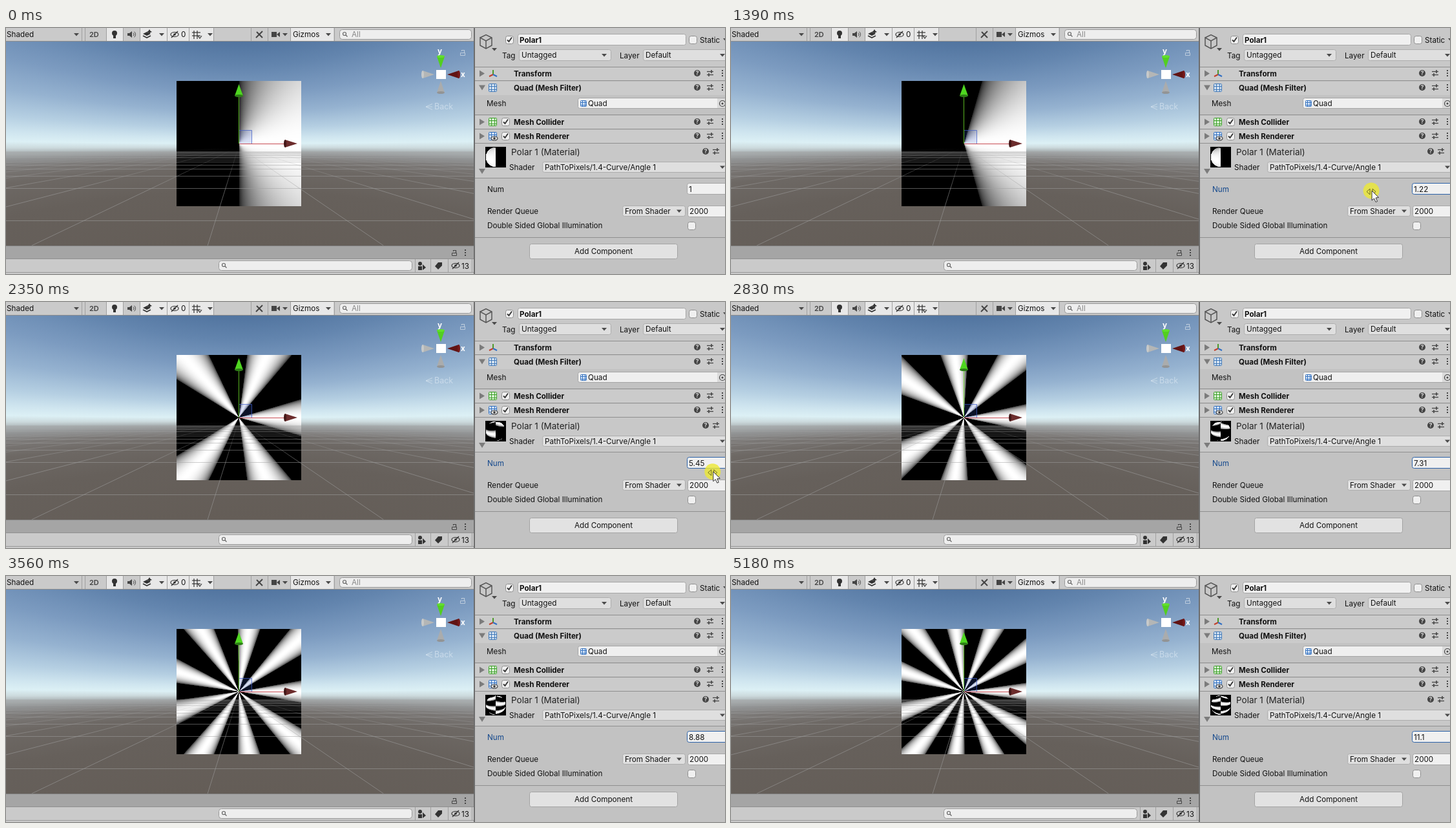
An HTML page with a canvas for the animation above (6.11 s loop, 1113 by 381 pixels).

```html
<!DOCTYPE html>
<html lang="en">
<head>
<meta charset="utf-8">
<style>
html, body { margin: 0; width: 100%; height: 100%; overflow: hidden; background: #c2c2c2; }
canvas { display: block; }
</style>
</head>
<body>
<canvas id="stage" width="1113" height="381"></canvas>
<script>
const LOOP = 6110, TAU = Math.PI * 2;
const view = document.getElementById('stage').getContext('2d');

function layer(w, h) {
  const c = document.createElement('canvas');
  c.width = w;
  c.height = h;
  return c.getContext('2d');
}
const back = layer(1113, 381), front = layer(1113, 381);
const quad = layer(193, 194), ball = layer(32, 32);
let g = back;

// Drawing helpers
function rect(x, y, w, h, fill) {
  g.fillStyle = fill;
  g.fillRect(x, y, w, h);
}
function box(x, y, w, h, fill, stroke = '#a6a6a6', r = 3) {
  g.beginPath();
  g.roundRect(x + .5, y + .5, w - 1, h - 1, r);
  if (fill) { g.fillStyle = fill; g.fill(); }
  g.strokeStyle = stroke;
  g.lineWidth = 1;
  g.stroke();
}
function text(s, x, y, { size = 11.7, weight = 400, color = '#111' } = {}) {
  g.font = `${weight} ${size}px Inter, sans-serif`;
  g.fillStyle = color;
  g.fillText(s, x, y);
}
const bold = (s, x, y) => text(s, x, y, { weight: 700, size: 11.6 });
function line(points, color = '#444', width = 1) {
  g.beginPath();
  for (let i = 0; i < points.length; i += 2) g.lineTo(points[i], points[i + 1]);
  g.strokeStyle = color;
  g.lineWidth = width;
  g.stroke();
}
function poly(points, fill) {
  g.beginPath();
  for (let i = 0; i < points.length; i += 2) g.lineTo(points[i], points[i + 1]);
  g.closePath();
  g.fillStyle = fill;
  g.fill();
}
function oval(x, y, rx, ry, fill, stroke) {
  g.beginPath();
  g.ellipse(x, y, rx, ry, 0, 0, TAU);
  if (fill) { g.fillStyle = fill; g.fill(); }
  if (stroke) { g.strokeStyle = stroke; g.lineWidth = 1.2; g.stroke(); }
}

// Icons
const caret = (x, y) => poly([x - 4, y - 2, x + 4, y - 2, x, y + 2.5], '#4a4a4a');
const foldout = (x, y, open) => poly(open
  ? [x - 5, y - 4, x + 5, y - 4, x, y + 4]
  : [x - 4, y - 5, x + 4, y, x - 4, y + 5], '#7b7b7b');
function dots(x, y) {
  for (const d of [-4, 0, 4]) rect(x - 1, y + d - 1, 2, 2, '#444');
}
function check(x, y, on) {
  box(x - 6, y - 6, 13, 13, '#f0f0f0', '#8e8e8e');
  if (on) line([x - 3, y + .5, x - .5, y + 3, x + 4, y - 3.5], '#333', 1.8);
}
function mesh(x, y, size, color, fill) {
  box(x, y, size, size, fill, color, 1);
  for (const k of [1, 2]) {
    const p = Math.round(size * k / 3) + .5;
    line([x + p, y, x + p, y + size], color);
    line([x, y + p, x + size, y + p], color);
  }
}
function help(x, y) {
  oval(x, y, 5, 5, '#444');
  text('?', x - 2.5, y + 3.3, { size: 9, weight: 700, color: '#ddd' });
}
function sliders(x, y) {
  line([x - 5, y - 2.5, x + 5, y - 2.5], '#444', 1.3);
  line([x - 5, y + 2.5, x + 5, y + 2.5], '#444', 1.3);
  line([x + 2, y - 5, x + 2, y], '#444', 1.6);
  line([x - 2, y, x - 2, y + 5], '#444', 1.6);
}
function glass(x, y) {
  oval(x, y - 1, 2.5, 2.5, null, '#666');
  line([x + 2, y + 1, x + 4.5, y + 3.5], '#666', 1.2);
}
function eyeOff(x, y) {
  oval(x, y, 6, 3.5, null, '#333');
  oval(x, y, 1.8, 1.8, '#333');
  line([x - 5, y + 5, x + 5, y - 5], '#333', 1.4);
}
function lock(x, y, color) {
  box(x - 4, y, 8, 5, null, color, 0);
  line([x - 1.5, y - 2, x - 1.5, y - 3.5, x + 2.5, y - 3.5, x + 2.5, y], color, 1.2);
}
function dropdown(s, x, y, w, h, arrow) {
  box(x, y, w, h, '#dfdfdf', '#adadad');
  text(s, x + 4, y + h / 2 + 4.2);
  caret(arrow, y + h / 2);
}

// Colour depends on elevation, so bands widen away from the centre of the lens
function drawSky() {
  const focal = 275, horizon = 184;
  const sky = g.createLinearGradient(0, -164, 0, 153);
  [[20, '#51749f'], [60, '#6385ae'], [100, '#7c9bc0'], [130, '#95b2d0'], [155, '#b5cfe2'],
   [170, '#cfe5ef'], [179, '#dcf0f5'], [185, '#ccdadd'], [190, '#acb4b6'], [196, '#8f9192'],
   [204, '#7b7876'], [218, '#6d6864'], [250, '#66605b'], [337, '#645d57']]
    .forEach(([y, c]) => sky.addColorStop((y - 20) / 317, c));
  g.save();
  g.beginPath();
  g.rect(0, 20, 724, 317);
  g.clip();
  for (let x = 0; x < 724; x++) {
    const stretch = Math.hypot(focal, x - 361) / focal;
    g.setTransform(1, 0, 0, stretch, 0, horizon);
    rect(x, -170, 1, 340, sky);
  }
  g.restore();
}

function drawToolbar() {
  rect(0, 0, 724, 20, '#cacaca');
  for (const [x, w] of [[156, 25], [207, 42], [250, 33], [284, 37], [441, 66]]) rect(x, 0, w, 20, '#e8e8e8');
  for (const x of [117, 122, 155, 181, 207, 249, 283, 321, 379, 405, 440, 508]) rect(x, 0, 1, 20, '#a0a0a0');
  rect(0, 20, 724, 1, '#8d8d8d');
  text('Shaded', 1, 14);
  text('2D', 129, 14, { weight: 600, color: '#444', size: 11 });
  for (const x of [109, 241, 316, 432, 499]) caret(x, 10);
  oval(168, 8, 4, 4, '#333');
  rect(166, 11, 4, 5, '#333');
  poly([188, 8, 191, 8, 195, 5, 195, 15, 191, 12, 188, 12], '#444');
  for (const r of [3, 5.5]) {
    g.beginPath();
    g.arc(195, 10, r, -.9, .9);
    g.strokeStyle = '#444';
    g.stroke();
  }
  poly([212, 9, 218, 6, 224, 9, 218, 12], '#333');
  line([212, 12, 218, 15, 224, 12], '#333', 1.6);
  poly([222, 2, 223.5, 4.5, 226, 6, 223.5, 7, 222, 9, 220.5, 7, 218, 6, 220.5, 4.5], '#333');
  eyeOff(261, 10);
  text('0', 271, 14);
  for (const d of [-3, 2]) {
    line([288, 10 + d, 301, 10 + d], '#333', 1.2);
    line([294 + d, 4, 294 + d, 17], '#333', 1.2);
  }
  line([297, 12, 300, 16, 303, 12], '#333', 1.2);
  line([387, 15, 397, 5], '#444', 2);
  line([388, 6, 397, 15], '#444', 2);
  rect(411, 6, 8, 8, '#444');
  poly([419, 10, 424, 6, 424, 14], '#444');
  text('Gizmos', 444, 14);
  box(516, 2, 205, 16, '#eeeeee', '#999', 4);
  glass(524, 10);
  text('All', 535, 14, { color: '#888' });
}

function drawBottomBar() {
  rect(0, 337, 724, 20, '#a5a5a5');
  rect(0, 337, 724, 1, '#828282');
  rect(0, 357, 724, 24, '#cacaca');
  rect(0, 357, 724, 1, '#8f8f8f');
  rect(0, 378, 724, 1, '#999');
  lock(694, 348, '#444');
  dots(711, 348);
  box(329, 360, 300, 16, '#eeeeee', '#9b9b9b', 4);
  glass(337, 368);
  for (const x of [633, 657, 684, 721]) rect(x, 358, 1, 20, '#a0a0a0');
  oval(641, 365, 3, 3, '#333');
  rect(638, 369, 6, 6, '#333');
  poly([645, 366, 650, 371, 645, 375], '#333');
  poly([664, 369, 669, 363, 675, 363, 675, 368, 669, 374], '#333');
  eyeOff(696, 368);
  text('13', 705, 373);
}

function drawInspector() {
  rect(724, 0, 2, 381, '#6d6d6d');
  rect(726, 0, 387, 381, '#c2c2c2');
  rect(726, 0, 387, 60, '#c8c8c8');
  for (const y of [61, 83, 136, 158]) rect(726, y, 387, 21, '#cbcbcb');
  rect(726, 179, 387, 53, '#c8c8c8');
  for (const y of [60, 81, 134, 156, 178, 232, 324]) rect(726, y, 387, 1, '#8f8f8f');

  line([734, 15, 743, 10.5, 752, 15, 752, 27, 743, 32, 734, 27, 734, 15, 743, 20, 752, 15], '#555', 1.5);
  line([743, 20, 743, 32], '#555', 1.5);
  caret(756, 33);
  check(779, 18, true);
  box(792, 9, 261, 18, '#f0f0f0');
  bold('Polar1', 795, 23);
  check(1063, 18, false);
  text('Static', 1074, 23);
  caret(1114, 18);
  text('Tag', 768, 47);
  dropdown('Untagged', 794, 33, 143, 18, 926);
  text('Layer', 950, 47);
  dropdown('Default', 986, 33, 140, 18, 1109);

  [['Transform', 70], ['Quad (Mesh Filter)', 92], ['Mesh Collider', 145], ['Mesh Renderer', 167]].forEach(([s, y], i) => {
    foldout(737, y + .5, i === 1);
    bold(s, 786, y + 4.5);
    help(1070, y);
    sliders(1090, y);
    dots(1109, y);
    if (i > 1) check(773, y, true);
  });
  line([754, 72, 754, 65], '#4c9a2a', 2);
  line([754, 72, 748, 75], '#c2402b', 2);
  line([754, 72, 760, 75], '#2f6fc4', 2);
  mesh(747, 86, 13, '#3f78b8', '#d3e1f0');
  mesh(747, 139, 13, '#3fa02c', '#d5efcf');
  mesh(747, 161, 13, '#3572c0', '#cfe0f5');
  oval(756, 171, 5, 3, '#ddd', '#444');
  oval(756, 171, 1.7, 1.7, '#333');

  text('Mesh', 744, 121);
  box(885, 108, 235, 17, '#efefef');
  mesh(889, 112, 10, '#3572c0', '#dce9f8');
  text('Quad', 901, 121);
  rect(1101, 109, 12, 15, '#dadada');
  oval(1109, 117, 4.5, 4.5, null, '#444');
  oval(1109, 117, 1.5, 1.5, '#444');

  text('Polar 1 (Material)', 782, 196.5, { size: 13.5, color: '#222' });
  help(1083, 191);
  sliders(1099, 191);
  foldout(737, 222, true);
  text('Shader', 779, 220);
  dropdown('PathToPixels/1.4-Curve/Angle 1', 830, 207, 290, 17, 1109);

  text('Render Queue', 745, 288);
  dropdown('From Shader', 954, 275, 98, 17, 1042);
  box(1055, 275, 66, 18, '#f0f0f0');
  text('2000', 1058, 288);
  text('Double Sided Global Illumination', 745, 310);
  check(1061, 306, false);
  box(810, 334, 230, 24, '#e2e2e2', '#a3a3a3');
  text('Add Component', 880, 350);
}

function drawFloorGrid() {
  g.save();
  g.beginPath();
  g.rect(0, 186, 724, 151);
  g.clip();
  for (let n = 0; n < 20; n++) {
    const y = Math.floor(184 + 1 / (.00877 + .0067 * n)) + .5;
    line([0, y, 724, y], `rgba(160,160,160,${.55 - n * .02})`);
  }
  const fade = g.createLinearGradient(0, 186, 0, 250);
  fade.addColorStop(0, 'rgba(160,160,160,0)');
  fade.addColorStop(1, 'rgba(160,160,160,.55)');
  for (let k = -8; k <= 8; k++) {
    line([360, 184, 360 + (k * 1.78 - .313) * 153, 337], fade);
  }
  g.restore();
}

function drawHandles() {
  rect(361, 159, 19, 20, 'rgba(60,100,220,.18)');
  line([361, 158.5, 380.5, 158.5, 380.5, 179], 'rgba(62,92,200,.75)');
  line([360.5, 179, 360.5, 105], 'rgba(110,225,40,.8)');
  poly([360.5, 87, 367, 105, 354, 105], '#4fd620');
  oval(360.5, 105, 6.5, 2, '#2d7d17');
  line([361, 179.5, 432, 179.5], '#c64b52');
  poly([451, 179, 432, 173, 432, 185], '#6c2c2c');
  oval(432, 179, 2, 6, '#421717');
}

function drawCompass() {
  const cone = (angle, color, base) => {
    g.save();
    g.translate(673, 72);
    g.rotate(angle);
    poly([10, 0, 28, -6, 28, 6], color);
    oval(28, 0, 2, 6, base);
    g.restore();
  };
  cone(-Math.PI / 2, '#52cf1f', '#62df2e');
  cone(0, '#611313', '#751818');
  cone(Math.PI, '#b4b6b6', '#c8caca');
  cone(Math.PI / 2, '#aaacad', '#929495');
  rect(666, 65, 15, 14, '#fff');
  text('y', 668, 40, { weight: 700, color: '#fff' });
  text('x', 704, 76, { weight: 700, color: '#fff' });
  lock(707, 38, 'rgba(210,220,230,.75)');
  const pale = 'rgba(220,232,242,.65)';
  line([660, 117.5, 650, 122, 660, 126.5], pale);
  line([650, 122, 660, 122], pale);
  text('Back', 663, 126, { size: 12.5, color: pale });
}

// Polar stripes: brightness is cos(num * angle), shown with display gamma
const shade = (x, y, num) => 255 * Math.max(0, Math.cos(num * Math.atan2(y, x))) ** (1 / 2.2);

function fillPixels(ctx, pixel) {
  const { width: w, height: h } = ctx.canvas;
  const img = ctx.createImageData(w, h);
  for (let i = 0; i < w * h; i++) {
    const v = pixel((i % w + .5) / w - .5, .5 - (Math.floor(i / w) + .5) / h);
    img.data.set([v, v, v, 255], i * 4);
  }
  ctx.putImageData(img, 0, 0);
}

// The same stripes wrapped round a sphere seen from slightly above
function ballShade(u, v, num) {
  const x = u * 2.1, y = v * 2.1, zz = 1 - x * x - y * y;
  if (zz < 0) return 0;
  const z = Math.sqrt(zz), tilt = .35;
  const up = y * Math.cos(tilt) + z * Math.sin(tilt);
  const depth = z * Math.cos(tilt) - y * Math.sin(tilt);
  const lon = Math.atan2(x, depth) / TAU;
  return shade(lon < 0 ? lon + .5 : lon - .5, Math.asin(up) / Math.PI, num);
}

function track(keys, t) {
  const i = keys.findIndex(k => k[0] > t);
  if (i < 0) return keys[keys.length - 1].slice(1);
  if (i === 0) return keys[0].slice(1);
  const [a, b] = [keys[i - 1], keys[i]];
  const p = (t - a[0]) / (b[0] - a[0]);
  return a.slice(1).map((v, j) => v + (b[j + 1] - v) * p);
}
const numKeys = [[0, 1], [1200, 1], [1390, 1.22], [1550, 2], [1950, 3.89], [2830, 7.31], [3544, 8.88], [4020, 11.1]];
const cursorKeys = [[150, 1079, 357], [750, 978, 264], [1150, 986, 256], [1390, 991, 252],
  [1550, 1009, 253], [1950, 1053, 259], [2110, 1069, 262], [2750, 1135, 264]];

function drawCursor(x, y, dragging) {
  oval(x, y, 12.5, 12.5, 'rgba(236,232,50,.8)');
  if (dragging) {
    for (const s of [-1, 1]) line([x + s * 2, y - 3, x + s * 7, y + 1.5, x + s * 2, y + 6, x + s * 2, y - 3], '#6d6a20');
  }
  const shape = [0, 0, 0, 15, 3.5, 12, 6, 17.5, 8.5, 16.5, 6, 11, 10.5, 10.5].map((v, i) => v + (i % 2 ? y : x + 1));
  poly(shape, '#fff');
  line([...shape, shape[0], shape[1]], '#333');
}

drawSky();
drawToolbar();
drawBottomBar();
drawInspector();
g = front;
drawFloorGrid();
drawHandles();
drawCompass();
g = view;

let shownNum;
function render(time) {
  const step = time < 2830 ? 80 : 1190 / 15;
  const t = 2830 + Math.floor((time - 2830) / step + .01) * step + .5;
  const num = Number(track(numKeys, t)[0].toPrecision(3));
  const active = time >= 880;
  if (num !== shownNum) {
    fillPixels(quad, (x, y) => shade(x, y, num));
    fillPixels(ball, (x, y) => ballShade(x, y, num));
    shownNum = num;
  }
  g.drawImage(back.canvas, 0, 0);
  g.drawImage(quad.canvas, 264, 82);
  g.drawImage(front.canvas, 0, 0);
  g.drawImage(ball.canvas, 742, 184);
  text('Num', 745, 254, { color: active ? '#12478c' : '#111' });
  box(1054, 240, 66, 18, '#f0f0f0', active ? '#2c62a8' : '#a6a6a6');
  text(String(num), 1057, 254);
  if (time >= 150 && time < 2790) drawCursor(...track(cursorKeys, t), active);
}

function tick() {
  render(performance.now() % LOOP);
  requestAnimationFrame(tick);
}
tick();
</script>
</body>
</html>
```
